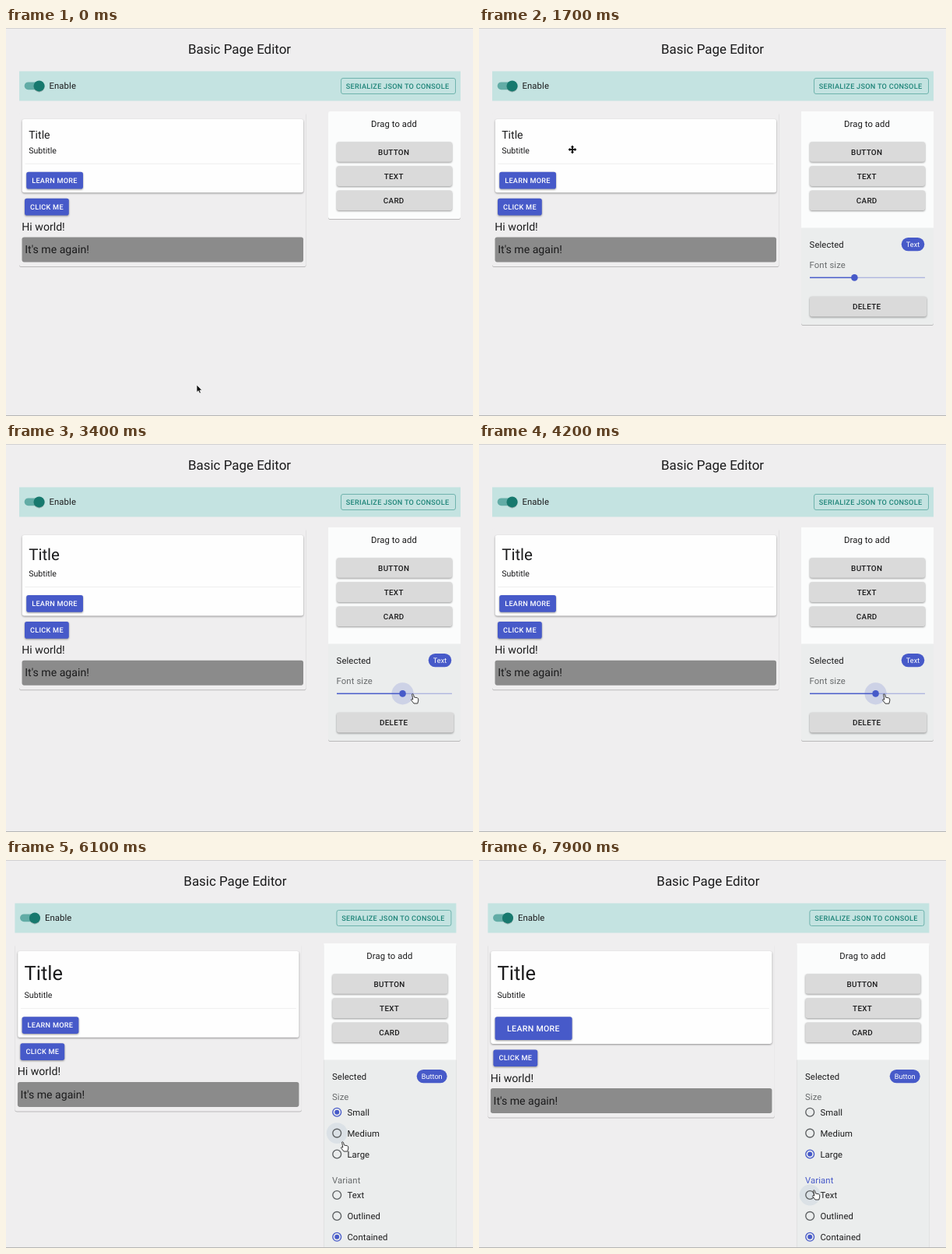
Recreate the animation shown at these times as an HTML page. Size 600 by 498 pixels, loop 8 s.

```html
<!DOCTYPE html>
<html>
<head>
<meta charset="utf-8">
<style>
  html, body { margin: 0; width: 100%; height: 100%; overflow: hidden; background: #efeeef; }
  svg { display: block; }
  text { font-family: Roboto, sans-serif; text-rendering: geometricPrecision; white-space: pre; }
  .caps { font-weight: 500; letter-spacing: .02857em; }
  .body { letter-spacing: .00938em; }
  .low { filter: drop-shadow(0 1px .5px rgba(0,0,0,.22)); }
  .high { filter: drop-shadow(0 1.2px .8px rgba(0,0,0,.4)); }
</style>
</head>
<body>
<svg id="stage" width="600" height="498" viewBox="0 0 600 498"></svg>
<script>
const S = 600 / 850; // page zoom
const LOOP = 8000, GLIDE = 700;
const PAGE = '#efeeef', INK = '#1b1b1c', GREY = '#686b6c', BLUE = '#475ac9', TEAL = '#1d8478';
const stage = document.getElementById('stage');

// Moments of the mouse actions
const click = { title: 1200, grab: 2800, drop: 4500, button: 5400, medium: 6500, large: 7000, variant: 7900 };

// Pointer stops: arrival time, x, y
const stops = [
  [0, 245, 458], [1000, 56, 140], [1700, 120, 156], [2400, 484, 320], [3200, 522, 320], [4100, 518, 320],
  [4500, 531, 321], [5200, 36, 206], [6100, 432, 361], [6400, 427, 351], [6900, 427, 378], [7900, 430, 423]
];

// The pointer rests, then glides to the next stop just in time
function pointer(t) {
  const i = stops.findIndex(s => s[0] > t);
  if (i < 0) return stops.at(-1).slice(1);
  const [t0, x0, y0] = stops[i - 1], [t1, x1, y1] = stops[i];
  const k = Math.max(0, 1 - (t1 - t) / Math.min(GLIDE, t1 - t0));
  const e = k * k * (3 - 2 * k);
  return [x0 + (x1 - x0) * e, y0 + (y1 - y0) * e];
}

// Dragging snaps the font size to steps of 7, starting from 1
function fontAt(t) {
  if (t < click.grab) return 20;
  const [x] = pointer(Math.min(t, click.drop));
  return 1 + 7 * Math.round((x - 429) / 148 * 7);
}

const rect = (x, y, w, h, fill, r = 0, cls = '') =>
  `<rect x="${x}" y="${y}" width="${w}" height="${h}" rx="${r}" fill="${fill}" class="${cls}"/>`;
const circle = (x, y, r, fill, extra = '') =>
  `<circle cx="${x}" cy="${y}" r="${r}" fill="${fill}" ${extra}/>`;
const text = (x, y, str, px, fill = INK, cls = '', anchor = 'start') =>
  `<text x="${x}" y="${y}" font-size="${px * S}" fill="${fill}" class="${cls}" text-anchor="${anchor}">${str}</text>`;

const greyButton = (y, label, w = 148) =>
  rect(425, y, w, 25.6, '#dadada', 2.8, 'high') + text(498.2, y + 16.3, label, 14, INK, 'caps', 'middle');

const blueButton = (x, y, w, h, label, px, pad, fill = BLUE) =>
  rect(x, y, w, h, fill, 2.8, 'high') +
  text(x + pad, y + h / 2 + px * S * .355, label, px, '#fff', 'caps');

function header() {
  return text(300, 32.8, 'Basic Page Editor', 24, INK, '', 'middle') +
    rect(17, 55.5, 567, 38, '#c4e3e1') +
    rect(23.7, 69.4, 24, 9.8, '#62aca6', 4.9) +
    circle(42.6, 74.4, 7, '#17796e', 'class="low"') +
    text(55.5, 78, 'Enable', 16, INK, 'body') +
    `<rect x="430.5" y="64.5" width="147" height="20" rx="2.5" fill="none" stroke="#6fb3ad"/>` +
    text(436.8, 77.5, 'SERIALIZE JSON TO CONSOLE', 13, TEAL, 'caps');
}

function canvas(font, size, px, py) {
  const grow = (font - 20) * 1.03; // taller title line
  const w = 72.8 + 13.1 * size, h = 21.7 + 4.05 * size;
  const top = 184.8 + grow, d = grow + h - 21.7;
  const hover = px > 26 && px < 26 + w && py > top && py < top + h;
  return rect(17, 108, 368.5, 198 + d, PAGE, 2.8, 'low') +
    rect(20.8, 117, 361.2, 94.3 + d, '#fefefe', 2.8, 'high') +
    text(29.2, 137.3 + grow / 2 + font * S * .3415, 'Title', font) +
    text(29.2, 160.8 + grow, 'Subtitle', 15) +
    rect(24.5, 173.8 + grow, 354, .8, '#ececec') +
    blueButton(26.2, top, w, h, 'LEARN MORE', 13 + size, 7 + 4.25 * size, hover ? '#2d3b8b' : BLUE) +
    blueButton(24, 218.8 + d, 56.8, 21.7, 'CLICK ME', 13, 7) +
    text(20.3, 260 + d, 'Hi world!', 20) +
    rect(20.5, 268.4 + d, 361.5, 32, '#8b8b8b', 2.8) +
    text(24.2, 289.2 + d, "It's me again!", 20);
}

function toolbox(panel) {
  const end = [245, 381, 520][panel];
  return rect(414, 107, 170, end - 107, panel ? '#ebeded' : '#fbfcfc', 2.8, 'low') +
    (panel ? rect(414, 107, 170, 149.5, '#fbfcfc') : '') +
    text(498.5, 127, 'Drag to add', 16, INK, 'body', 'middle') +
    ['BUTTON', 'TEXT', 'CARD'].map((s, i) => greyButton(146.2 + i * 31.1, s)).join('');
}

const selected = (label, w) =>
  text(424.6, 281.5, 'Selected', 16, INK, 'body') +
  rect(572.3 - w, 269, w, 17.2, BLUE, 8.6) +
  text(572.3 - w / 2, 280.9, label, 13, '#fff', '', 'middle');

function slider(t, font) {
  const x = 425 + 148 * (font - 1) / 49;
  const dragging = t >= click.grab && t <= click.drop;
  const halo = t < click.grab ? 0 : dragging ? 14.1 : 9.9;
  return selected('Text', 29.6) +
    text(424.6, 308, 'Font size', 16, GREY, 'body') +
    rect(425, 319.7, 148, 1.4, '#aeb5df') + rect(425, 319.7, x - 425, 1.4, BLUE) +
    circle(x, 320.4, halo, BLUE, 'opacity=".18"') + circle(x, 320.4, 4.3, BLUE) +
    greyButton(344.8, 'DELETE', 150);
}

function radios(labels, top, checked, py) {
  return labels.map((label, i) => {
    const y = top + i * 26.9, on = i === checked, color = on ? BLUE : '#5c5f61';
    const hover = Math.abs(py - y) < 13.4;
    return (hover ? circle(430.8, y, 13.4, '#4f7fae', 'opacity=".1"') : '') +
      circle(430.8, y, 5.4, 'none', `stroke="${color}" stroke-width="1.35"`) +
      (on ? circle(430.8, y, 3, BLUE) : '') +
      text(444, y + 4, label, 16, INK, 'body');
  }).join('');
}

function buttonSettings(t, size, px, py) {
  const focus = t >= click.variant ? 'Variant' : t >= click.medium ? 'Size' : '';
  const title = (name, y) => text(424.6, y, name, 16, focus === name ? BLUE : GREY, 'body');
  const y = px > 410 ? py : 0;
  return selected('Button', 39) +
    title('Size', 308) + radios(['Small', 'Medium', 'Large'], 323.7, size, y) +
    title('Variant', 414.6) + radios(['Text', 'Outlined', 'Contained'], 430, 2, y);
}

const arms = [0, 90, 180, 270].map(a =>
  `<path d="M-.9 0V-2.8H-2.2L0-5.4 2.2-2.8H.9V0Z" transform="rotate(${a})"/>`).join('');
const shapes = {
  arrow: '<path d="M0 0V9.6L2.2 7.6 3.7 11 5.4 10.2 4 7H6.9Z" fill="#111" stroke="#fff" stroke-width=".7"/>',
  move: `<g stroke="#fff" stroke-width="1.4">${arms}</g><g fill="#111">${arms}</g>`,
  hand: '<path d="M-.4 1.2Q.8 0 1.6 1.8L2.4 5 6.6 5.8Q8 6.2 7.8 9L6.8 13H2L-1.6 8.4Q-1.6 6.8 .8 8Z" fill="#fff" stroke="#222" stroke-width=".9" stroke-linejoin="round"/>'
};

function cursor(panel, x, y) {
  const control = x > 413 && y > 311 && (panel === 2 || panel === 1 && y < 332);
  const kind = control ? 'hand' : x > 17 && x < 385 && y > 110 && y < 307 ? 'move' : 'arrow';
  return `<g transform="translate(${x} ${y})">${shapes[kind]}</g>`;
}

function draw(now) {
  const t = Math.floor(now % LOOP / 100) * 100;
  const [x, y] = pointer(t), font = fontAt(t);
  const panel = (t >= click.title) + (t >= click.button);
  const size = (t >= click.medium) + (t >= click.large);
  const shift = panel === 2 ? -5.6 : 0; // room for the scrollbar
  stage.innerHTML = rect(0, 0, 600, 498, PAGE) +
    `<g transform="translate(${shift})">` +
    header() + canvas(font, size, x - shift, y) + toolbox(panel) +
    (panel === 1 ? slider(t, font) : panel === 2 ? buttonSettings(t, size, x, y) : '') +
    '</g>' +
    rect(0, 0, 600, 1, '#d2d1d2') + rect(0, 497, 600, 1, '#b5b5b5') +
    cursor(panel, x, y);
  requestAnimationFrame(draw);
}
requestAnimationFrame(draw);
</script>
</body>
</html>
```
